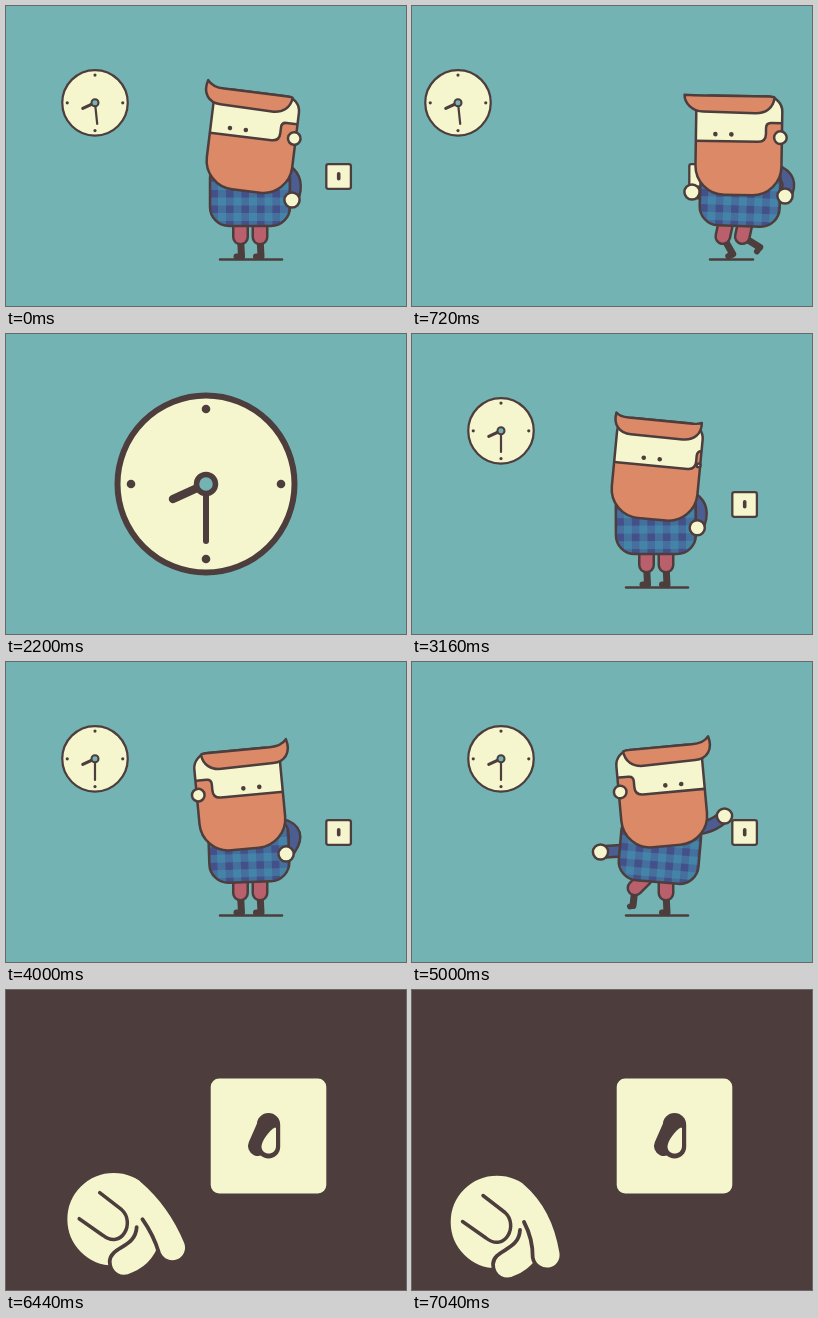
Recreate the animation shown at these times as an HTML page with a canvas. Size 400x300 px, loop 7.08 s.

```html
<!DOCTYPE html>
<html lang="en">
<head>
<meta charset="utf-8">
<title>Lights out at half past eight</title>
<style>
html, body { margin: 0; width: 100%; height: 100%; overflow: hidden; background: #73b3b4; }
canvas { display: block; width: 100vw; height: 100vh; }
</style>
</head>
<body>
<canvas id="stage"></canvas>
<script>
const LOOP = 7080, STEP = 40, RAD = Math.PI / 180;
const TEAL = '#73b3b4', DARK = '#4d3e3d', CREAM = '#f6f6ce',
      ORANGE = '#db8967', PANTS = '#b9606c', SLEEVE = '#4c5d91', SHIRT = '#44508a';

const canvas = document.getElementById('stage');
const c = canvas.getContext('2d');

const lerp = (a, b, k) => a + (b - a) * k;
const mix = (p, q, k) => p.map((v, i) => lerp(v, q[i], k));
const clamp = x => Math.max(0, Math.min(1, x));

// Eased value through time/value pairs
function keys(t, ...kv) {
  if (t <= kv[0]) return kv[1];
  for (let i = 2; i < kv.length; i += 2) {
    if (t < kv[i]) {
      const x = (t - kv[i - 2]) / (kv[i] - kv[i - 2]);
      return lerp(kv[i - 1], kv[i + 1], x * x * (3 - 2 * x));
    }
  }
  return kv[kv.length - 1];
}

function paint(path, fill, width) {
  if (fill) { c.fillStyle = fill; c.fill(path); }
  if (width) { c.strokeStyle = DARK; c.lineWidth = width; c.stroke(path); }
}

function disc(x, y, r, fill, width) {
  const p = new Path2D();
  p.arc(x, y, r, 0, 7);
  paint(p, fill, width);
}

function box(x, y, w, h, r) {
  const p = new Path2D();
  p.roundRect(x, y, w, h, r);
  return p;
}

function line(points, color, width) {
  c.beginPath();
  points.forEach(([x, y], i) => i ? c.lineTo(x, y) : c.moveTo(x, y));
  c.strokeStyle = color;
  c.lineWidth = width;
  c.stroke();
}

function at(x, y, angle, draw) {
  c.save();
  c.translate(x, y);
  c.rotate(angle * RAD);
  draw();
  c.restore();
}

function clock(x, y, scale, minute) {
  at(x, y, 0, () => {
    c.scale(scale, scale);
    disc(0, 0, 88.5, CREAM, 6);
    for (const [dx, dy] of [[0, -75], [75, 0], [0, 75], [-75, 0]]) disc(dx, dy, 4.3, DARK);
    line([[0, 0], [-33, 15]], DARK, 8.5);
    line([[0, 0], [57 * Math.sin(minute * RAD), 57 * Math.cos(minute * RAD)]], DARK, 6);
    disc(0, 0, 9.5, TEAL, 5.5);
  });
}

function leg(hip, knee, ankle, toe) {
  line([knee, ankle], DARK, 7);
  line([ankle, toe], DARK, 6);
  line([hip, knee], DARK, 17);
  line([hip, knee], PANTS, 12);
}

function walkLeg(x, phase, w) {
  const thigh = (12 - 15 * Math.sin(phase)) * w * RAD;
  const shin = (42 - 15 * Math.cos(phase) + 35 * Math.sin(phase)) * w * RAD;
  const hip = [x - 2.7 * w, 212];
  const knee = [hip[0] - 19 * Math.sin(thigh), 212 + 19 * Math.cos(thigh)];
  const ankle = [knee[0] + 1 + 19.5 * Math.sin(shin), knee[1] + 19.5 * Math.cos(shin)];
  leg(hip, knee, ankle, [ankle[0] - 5 * Math.cos(shin), ankle[1] + 5 * Math.sin(shin)]);
}

function arm(from, ctrl, to, width, edge) {
  const p = new Path2D(`M${from}Q${ctrl} ${to}`);
  paint(p, null, width);
  c.strokeStyle = SLEEVE;
  c.lineWidth = width - 2 * edge;
  c.stroke(p);
}

function torso() {
  const shape = box(-40, -62, 80, 62, [14, 14, 19, 19]);
  paint(shape, SHIRT);
  c.save();
  c.clip(shape);
  c.fillStyle = 'rgba(72,172,194,.33)';
  for (let i = -3; i < 3; i++) c.fillRect(i * 15.5 - 1, -62, 8, 62);
  for (let i = 0; i < 5; i++) c.fillRect(-40, -13 - i * 15.5, 80, 8);
  c.restore();
  paint(shape, null, 2.5);
}

// One end of the hair; m = 1 is the quiff, 0 the rounded back
function hairEnd(side, m, flat) {
  const round = [16, -82, 27, -82, 34, -88, 35, -98, 34, -99, 30, -99];
  const quiff = [36, -83, 48, -83, 55, -92, 51 + 4 * flat, -105.5 + 6 * flat, 46, -99, 34, -99];
  const v = mix(round, quiff, m);
  return [0, 2, 4, 6, 8, 10].map(i => [v[i] * side, v[i + 1]]);
}

// turn: 0 looks left, 1 looks right
function head(turn, flat) {
  const face = box(-43, -99, 86, 99, [15, 15, 29, 29]);
  paint(face, CREAM);
  const l = -27 - 33 * (1 - turn), r = 27 + 33 * turn;
  const beard = new Path2D(
    `M-80 -72.5L${l - 5} -72.5Q${l} -72.5 ${l} -67.5V-61.5Q${l} -53.5 ${l + 8} -53.5` +
    `H${r - 8}Q${r} -53.5 ${r} -61.5V-67.5Q${r} -72.5 ${r + 5} -72.5H80V10H-80Z`);
  c.save();
  c.clip(face);
  paint(beard, ORANGE, 2.5);
  c.restore();
  paint(face, null, 2.5);

  const a = hairEnd(1, turn, flat), b = hairEnd(-1, 1 - turn, flat);
  paint(new Path2D(`M${a[0]}C${a[1]} ${a[2]} ${a[3]}Q${a[4]} ${a[5]}` +
    `L${b[5]}Q${b[4]} ${b[3]}C${b[2]} ${b[1]} ${b[0]}Z`), ORANGE, 2.5);

  const eye = lerp(-15.6, 12, turn);
  disc(eye - 8, -60.5, 2.3, DARK);
  disc(eye + 8, -60.5, 2.3, DARK);
  const ear = Math.abs(1 - 2 * turn);
  if (ear > .05) disc(turn < .5 ? 41.5 : -41.5, -58, 6.3 * ear, CREAM, 2.5);
}

function man(t, u, w) {
  const phase = (t - 720) / 480 * 2 * Math.PI;
  const swing = Math.cos(phase), bob = Math.cos(2 * phase);
  const turn = keys(t, 3000, 0, 3400, 1);
  const lean = keys(t, 3000, 0, 3720, 1);
  const reach = keys(t, 3980, 0, 4680, 1.13, 5000, 1);

  c.save();
  c.translate(83 * u, 0);
  const mid = 245 - 8.5 * w, half = 31 - 9.5 * w;
  line([[mid - half, 253.5], [mid + half, 253.5]], DARK, 2.5);

  walkLeg(254, phase + Math.PI, w);
  if (reach > 0) {
    leg(mix([234.5, 212], [233, 216], reach), mix([234.5, 231], [223, 226], reach),
        mix([235.5, 250.5], [221, 243.5], reach), mix([230.5, 250.5], [218, 244.5], reach));
  } else {
    walkLeg(234.5, phase, w);
  }

  let left = mix([236, 188], [210 - 13 * swing, 186], w);
  left = mix(left, [188.5, 190], reach);
  let right = mix([286, 194], [296 - 6 * swing, 190], w);
  right = mix(mix(right, [280, 192], lean), [312.5, 154], reach);
  let bend = mix([294, 174], [300, 172], w);
  bend = mix(mix(bend, [297, 172], lean), [300, 166], reach);

  arm([222, 188], mix([222, 188], left, .5), left, 14, 2.4);
  disc(...left, 7.6, CREAM, 2.5);
  arm(mix([280, 164], [282, 167], reach), bend, right, 14, 2.4);

  const tilt = lerp(lerp(2 * w, -2, lean), 5, reach);
  at(244 + reach, 220, tilt, torso);
  disc(...right, 7.6, CREAM, 2.5);

  let pose = mix([240, 185, 7], [243, 187 + 2 * bob, 3.5 - 2.6 * bob], w);
  pose = mix(mix(pose, [239, 187, -5.4], lean), [254.8, 184, -5.2], reach);
  at(...pose, () => head(turn, w));
  c.restore();
}

function room(t) {
  const walking = t >= 40 && t < 1440;
  const u = walking ? (1440 - t) / 720 : 0;
  const w = walking ? clamp((1440 - t) / 200) : 0;
  c.save();
  c.translate(-43 * u, 0);
  clock(89, 96.8, .37, t < 1760 ? 6 : 0);
  paint(box(320.3, 158.2, 24.6, 24.6, 2), CREAM, 2.3);
  line([[332.7, 167.7], [332.7, 172.8]], DARK, 3.6);
  c.restore();
  man(t, u, w);
}

function bigHand(x, y, tip, angle) {
  at(x, y, 0, () => {
    disc(0, 0, 48.3, CREAM, 4);
    paint(new Path2D('M23 8C22 29 -3 27 -4 42C-4 55 8 61 19 55C36 48 46 34 49 16'), CREAM, 3.8);
    const nx = 14.5 * Math.sin(angle * RAD), ny = -14.5 * Math.cos(angle * RAD);
    const [tx, ty] = tip;
    const low = [tx - nx, ty - ny];
    const sx = lerp(32, 27, (angle - 44) / 36);
    const knuckle = [(sx + low[0]) / 2 + (angle - 44) / 8, low[1] / 2 - 1];
    paint(new Path2D(`M28 -39Q57 -14 ${tx + nx} ${ty + ny}` +
      `A14.5 14.5 0 0 1 ${low}Q${knuckle} ${sx} 0`), CREAM, 3.8);
    paint(new Path2D('M-14 -26.5L8 -9.5C22 3 8 31 -11 16L-34.5 -.5'), null, 3.5);
  });
}

function lever(down) {
  at(262.5, 146, 0, () => {
    c.scale(1, down ? 1 : -1);
    paint(box(-11.7, -23, 23.4, 45.5, 11.7), DARK);
    line([[-3, -7], [-10.5, 10]], DARK, 20);
    paint(new Path2D('M6.5 -8.5C1 -6 -7 5 -7 10.5C-7 20 7.5 20 7.5 10V-8Z'), CREAM);
  });
}

function closeUp(t) {
  const dark = t >= 5560;
  if (dark) {
    c.fillStyle = DARK;
    c.fillRect(0, 0, 400, 300);
  }
  paint(box(202.2, 86, 120.6, 120, 11), CREAM, 5);
  lever(dark);

  let x, y, tip, angle;
  if (t < 5920) {
    x = keys(t, 5400, 165, 5560, 178, 5920, 148.5);
    y = t < 5560 ? 61 + 51 * clamp((t - 5400) / 160) ** 1.5
      : 198 - 86 * ((5920 - t) / 360) ** 1.5;
    tip = mix([75, 30], [74.5, 20], clamp((t - 5400) / 520));
    angle = 45;
  } else {
    const rest = (7040 - t) / 1120;
    const k = 1 - rest ** 1.65;
    x = lerp(148.5, 85, k);
    y = lerp(198, 232, 1 - rest ** 4);
    tip = mix([74.5, 20], [50, 33], k);
    angle = lerp(45, 80, k);
  }
  if (!dark) arm([-40, 135], [70, 140], [x, y], 56, 4);
  bigHand(x, y, tip, angle);
}

function draw(t) {
  const w = Math.round(innerWidth * devicePixelRatio);
  const h = Math.round(innerHeight * devicePixelRatio);
  if (canvas.width !== w || canvas.height !== h) {
    canvas.width = w;
    canvas.height = h;
  }
  c.setTransform(w / 400, 0, 0, h / 300, 0, 0);
  c.lineCap = c.lineJoin = 'round';
  c.fillStyle = TEAL;
  c.fillRect(0, 0, 400, 300);
  if (t >= 1760 && t < 2720) {
    clock(200, 150, 1, keys(t, 1920, 6, 2000, 10, 2120, -2, 2200, 0));
  } else if (t >= 5280) {
    closeUp(t);
  } else {
    room(t);
  }
}

const start = performance.now();
function tick(now) {
  const t = Math.max(0, now - start) % LOOP;
  draw(Math.floor(t / STEP) * STEP);
  requestAnimationFrame(tick);
}
draw(0);
requestAnimationFrame(tick);
</script>
</body>
</html>
```
